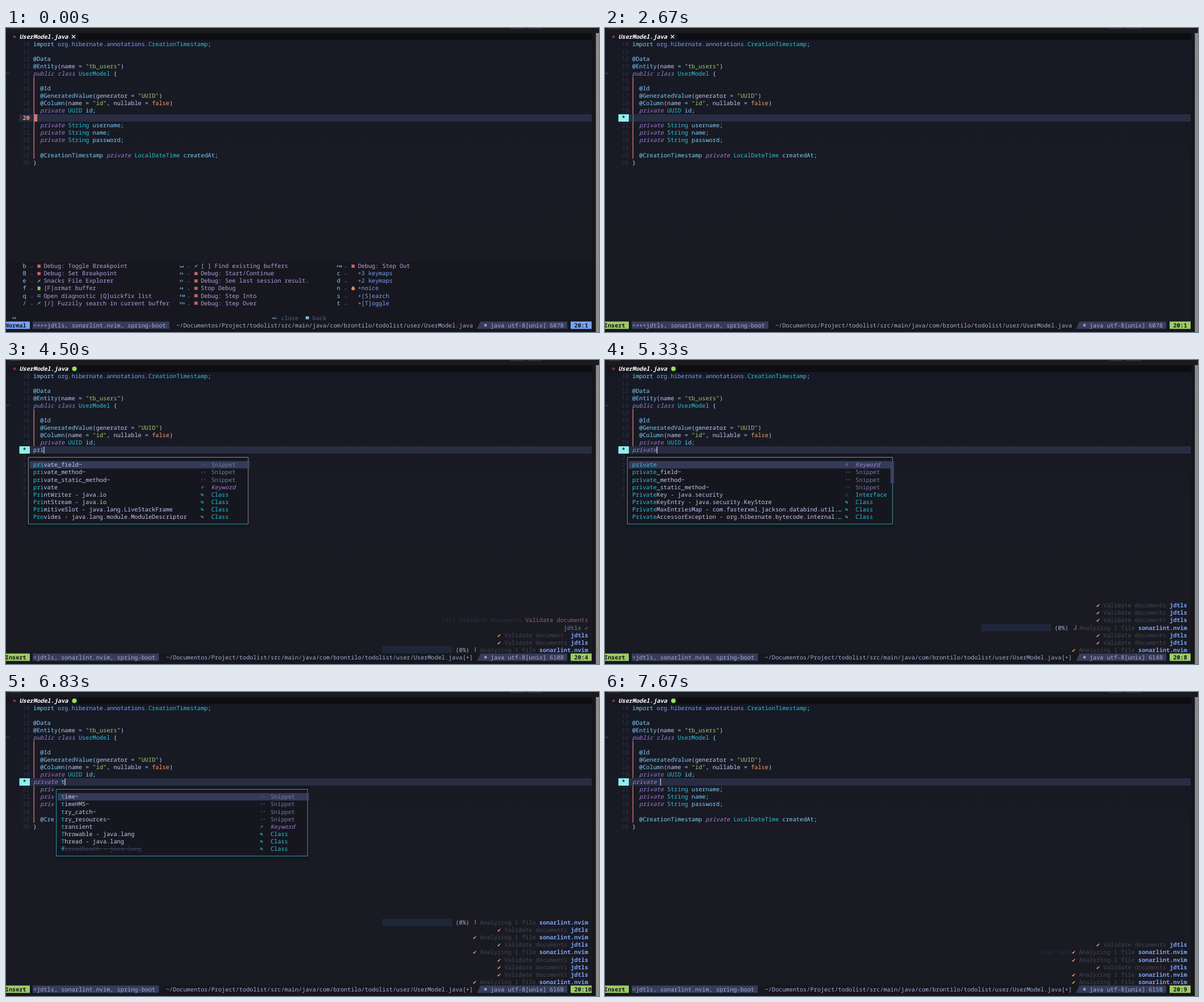
These frames come from a looping animation (1045x536 px, 8 s). An HTML page:

```html
<!DOCTYPE html>
<html lang="en">
<head>
<meta charset="utf-8">
<title>Editor completion</title>
<style>
  html, body { margin: 0; width: 100%; height: 100%; overflow: hidden; background: #191a23; }
  svg { display: block; width: 100%; height: 100%; }
  text {
    font: 10.25px "Noto Sans Mono", "DejaVu Sans Mono", "DejaVu Sans", monospace;
    white-space: pre; text-rendering: geometricPrecision; fill: #c0caf5;
  }
  .b { font-weight: 700; }
  .i { font-style: italic; }
  .k { fill: #9d7cd8; font-style: italic; }
  .t { fill: #2ac3de; }
  .a { fill: #7dcfff; }
  .p { fill: #7aa2f7; }
  .s { fill: #9ece6a; }
  .o { fill: #ff9e64; }
  .n { fill: #30354d; }
  .g { fill: #565f89; }
  .d { fill: #444654; }
  .l { fill: #b3a0e4; }
  .m { fill: #a4aed4; }
  .q { fill: #737aa2; }
  .f { fill: #2c3045; }
  .x { fill: #3b4261; text-decoration: line-through; }
  .u { fill: #8a6a60; }
  .w { fill: #ffffff; }
  .z { fill: #15161e; }
</style>
</head>
<body>
<svg viewBox="0 0 1045 536" preserveAspectRatio="none">
  <defs>
    <linearGradient id="bg" x2="0" y2="1">
      <stop offset="0" stop-color="#161924"/>
      <stop offset=".45" stop-color="#191a23"/>
      <stop offset="1" stop-color="#1a1a22"/>
    </linearGradient>
  </defs>
  <g id="view"></g>
</svg>
<script>
const LOOP = 8000, CELL = 6.15, ROW = 13.05;
const X = c => 48 + c * CELL;
const Y = r => 21.6 + r * ROW;
const view = document.getElementById('view');

const esc = s => s.replace(/&/g, '&amp;').replace(/</g, '&lt;');
const rect = (x, y, w, h, fill) => `<rect x="${x}" y="${y}" width="${w}" height="${h}" fill="${fill}"/>`;
const cells = (c, r, n, fill, rows = 1) => rect(X(c), Y(r), n * CELL, rows * ROW, fill);
const dot = (x, y, r, fill) => `<circle cx="${x}" cy="${y}" r="${r}" fill="${fill}"/>`;
const path = (d, stroke, w = 1) => `<path d="${d}" fill="none" stroke="${stroke}" stroke-width="${w}"/>`;
// «c text» colours a run with class c
const text = (c, r, s, cls = '', size = '') =>
  `<text x="${X(c)}" y="${Y(r) + 10.2}" class="${cls}"${size && ` style="font-size:${size}px"`}>` +
  esc(s).replace(/«(\w) (.*?)»/g, '<tspan class="$1">$2</tspan>') + '</text>';

const CODE = [
  '«a import» «p org.hibernate.annotations.»«t CreationTimestamp»«a ;»',
  '',
  '«a @Data»',
  '«a @Entity»(name «a =» «s "tb_users"»)',
  '«k public class» «t UserModel» {',
  '',
  '  «a @Id»',
  '  «a @GeneratedValue»(generator «a =» «s "UUID"»)',
  '  «a @Column»(name «a =» «s "id"», nullable «a =» «o false»)',
  '  «k private» «t UUID» «a id;»',
  '',
  '  «k private» «t String» «a username;»',
  '  «k private» «t String» «a name;»',
  '  «k private» «t String» «a password;»',
  '',
  '  «a @CreationTimestamp» «k private» «t LocalDateTime» «a createdAt;»',
  '}'
];

const KEYS = [
  [-3, ['b|bug|Debug: Toggle Breakpoint', 'B|bug|Debug: Set Breakpoint', 'e|pin|Snacks File Explorer',
    'f|file|[F]ormat buffer', 'q|list|Open diagnostic [Q]uickfix list', '/|pin|[/] Fuzzily search in current buffer']],
  [42, ['␣|pin|[ ] Find existing buffers', 'F5|bug|Debug: Start/Continue', 'F7|bug|Debug: See last session result.',
    'F9|bug|Stop Debug', 'F10|bug|Debug: Step Into', 'F11|bug|Debug: Step Over']],
  [87, ['F10|bug|Debug: Step Out', 'c||+3 keymaps', 'd||+2 keymaps', 'n|fire|+noice', 's||+[S]earch', 't||+[T]oggle']]
];

const KINDS = { s: ['Snippet', 'q', '‹›'], k: ['Keyword', 'k', '≡'], c: ['Class', 't', '↹'], i: ['Interface', 't', '⛬'] };
const SNIPPETS = ['s private_field~', 's private_method~', 's private_static_method~'];
const MENUS = {
  pri: { left: -2, right: 61, bar: 1, top: '#87929c', side: '#87929c', items: [...SNIPPETS, 'k private',
    'c PrintWriter - java.io', 'c PrintStream - java.io', 'c PrimitiveSlot - java.lang.LiveStackFrame',
    'c Provides - java.lang.module.ModuleDescriptor'] },
  private: { left: -2, right: 74, bar: 3, top: '#87929c', side: '#4f98a8', items: ['k private', ...SNIPPETS,
    'i PrivateKey - java.security', 'c PrivateKeyEntry - java.security.KeyStore',
    'c PrivateMaxEntriesMap - com.fasterxml.jackson.databind.util.…',
    'c PrivateAccessorException - org.hibernate.bytecode.internal.…'] },
  t: { left: 6, right: 78, bar: 1, top: '#27a1b9', side: '#27a1b9', items: ['s time~', 's timeHMS~', 's try_catch~',
    's try_resources~', 'k transient', 'c Throwable - java.lang', 'c Thread - java.lang', 'x ThreadDeath - java.lang'] }
};

// start, typed text, menu, notices from top to bottom (v validate, a analyzed, p in progress), spinner
const STEPS = [
  [0, '', '', ''],
  [4000, 'p', '', ''],
  [4170, 'p', '', 'p', '⠋'],
  [4330, 'pr', 'pri', 'vvp', '⠼'],
  [4500, 'pri', 'pri', 'mjwvp', '⠇'],
  [4670, 'priv', 'private', 'vvvp', '⠋'],
  [4830, 'priva', 'private', 'vvvp', '⠼'],
  [5000, 'privat', 'private', 'vpvva', '⠇'],
  [5170, 'private', 'private', 'vvpvva', '⠋'],
  [5330, 'private', 'private', 'vvvpvva', '⠼'],
  [5500, 'private', 'private', 'vvvpvva', '⠇'],
  [5670, 'private ', '', 'vvvavva', ''],
  [5830, 'private ', '', 'pvvvavvva', '⠋'],
  [6000, 'private t', '', 'pvvvavvva', '⠙'],
  [6170, 'private t', '', 'vpvvvavvva', '⠼'],
  [6330, 'private t', 't', 'vpvvvavvva', '⠇'],
  [6500, 'private t', 't', 'vvavavvva', ''],
  [6670, 'private t', 't', 'pvavavvva', '⠼'],
  [6830, 'private t', 't', 'pvavavvva', '⠇'],
  [7000, 'private t', 't', 'pvavavvva', '⠋'],
  [7170, 'private t', 't', 'pvavavvva', '⠼'],
  [7330, 'private t', 't', 'avavavvva', ''],
  [7500, 'private ', '', 'vavavaa', ''],
  [7670, 'private ', '', 'vaavaa', '']
];

function frame(dirty) {
  return rect(0, 0, 1045, 536, 'url(#bg)') + rect(0, 0, 1045, 9, '#1b1b1f') +
    rect(7, 0, 20, 1.5, '#34343a') + rect(888, 0, 24, 1.5, '#34343a') + rect(919, 0, 26, 1.5, '#34343a') +
    rect(0, 9, 1037, 12.5, '#0d0d12') + rect(0, 9, 128, 12.5, '#15161f') +
    dot(15, 15.5, 2.5, '#7d3238') + text(-4, -1, 'UserModel.java', 'b i w') +
    (dirty ? dot(120.5, 15.6, 4, '#9be05a') : path('M116 12.2l6 6m0-6l-6 6', '#e8e8ee', 1.4)) +
    rect(1033, 9, 6.5, 527, '#15161b') + rect(1039.5, 9, 5.5, 527, '#8f8d8b');
}

function code(typed, insert, mark, caret) {
  let out = cells(-4, 10, 0, 'none') + rect(23.4, Y(10), 1008.6, ROW, '#282d42');
  CODE.forEach((line, i) => {
    if (i !== 10) out += text(-3, i, String(i + 10), 'n');
    out += text(0, i, line);
  });
  out += path('M0.5 78.5l2.5 2.8l2.5-2.8', '#4a5a86');
  out += path(`M49.3 ${Y(5)}V${Y(10)}M49.3 ${Y(11)}V${Y(16)}`, '#c4686c', 1.6);
  if (!insert) {
    out += text(-3, 10, '20', 'b o') + rect(49, Y(10), 6.2, ROW, '#c9787a');
  } else {
    out += rect(23.6, Y(10), 18.4, ROW, '#8ff0ee') + text(-3, 10, mark, 'b z');
    const styled = typed.replace(/^private/, '«k private»').replace(/ t$/, ' «a t»');
    out += text(0, 10, styled, typed.startsWith('private') ? '' : 'a');
    if (caret) out += rect(X(typed.length) + (typed ? 0 : 1), Y(10) + 0.4, 1.2, 12.2, typed ? '#d5daf0' : '#7d8196');
  }
  return out;
}

function icon(kind, x, y) {
  if (kind === 'bug') return dot(x, y, 2.8, '#c9666b') + path(`M${x - 3.6} ${y - 2}h7.2m-7.2 4h7.2`, '#c9666b', 0.8);
  if (kind === 'pin') return path(`M${x - 2.5} ${y + 2.5}l5-5m-3.5 1l2.5 2.5`, '#7f8cb8', 1.1);
  if (kind === 'file') return rect(x - 2.5, y - 3.2, 5, 6.4, '#7fc27a');
  if (kind === 'list') return path(`M${x - 3} ${y - 1.5}h6m-6 3h6`, '#8a90ab', 1.1);
  if (kind === 'fire') return `<path d="M${x} ${y - 4}q5 4 2.6 6.4q-2.6 2-5.2 0q-1.6-2.6 2.6-6.4" fill="#e58a5c"/>`;
  return '';
}

function keyHelp() {
  let out = rect(0, 413, 1033, 104.5, '#17171f');
  for (const [col, list] of KEYS) {
    list.forEach((entry, i) => {
      const [key, pic, label] = entry.split('|'), r = 30 + i;
      out += key === '␣' ? path(`M${X(col) + 1} ${Y(r) + 6}v2.5h5v-2.5`, '#7dcfff')
        : text(col, key.length > 1 ? r - 0.13 : r, key, key.length > 1 ? 'a b' : 'a', key.length > 1 ? 5 : '');
      out += text(col + 2, r, '→', 'g') + icon(pic, X(col + 4) + 4, Y(r) + 6.8) +
        text(col + 6, r, label, label[0] === '+' ? 'p' : 'l');
    });
  }
  return out + path('M12 509.5v2.5h5v-2.5', '#7dcfff') + text(68.5, 36.87, 'esc', 'a b', 4.5) +
    text(71, 37, 'close', 'g') + rect(528, 508.5, 6, 5, '#86b4d8') + text(80, 37, 'back', 'g');
}

function popup({ left, right, bar, top, side, items }, typed) {
  const x1 = X(left + 0.5) + 0.6, x2 = X(right + 0.5) + 0.6, y1 = Y(11) + 6.4, y2 = Y(20) + 6.6;
  const hit = typed.split(' ').pop().length;
  let out = cells(left, 11, right - left + 1, '#16161e', 10) +
    path(`M${x1} ${y1}H${x2}`, top) + path(`M${x1} ${y1}V${y2}M${x2} ${y1}V${y2}`, side) +
    path(`M${x1} ${y2}H${x2}`, '#27a1b9') + cells(left + 1, 12, right - left - 1, '#343a58') +
    cells(right, 12, 1, '#3b4261', bar);
  items.forEach((item, i) => {
    const r = 12 + i, old = item[0] === 'x', name = item.slice(2);
    const [label, cls, pic] = KINDS[old ? 'c' : item[0]];
    out += text(left + 2, r, `«t ${name.slice(0, hit)}»` +
      (hit < name.length ? `«${old ? 'x' : 'e'} ${name.slice(hit)}»` : ''));
    if (old) out += path(`M${X(left + 2)} ${Y(r) + 6.6}h6`, '#2ac3de');
    out += text(right - 13, r - 0.08, pic, cls, 8) + text(right - 10, r, label, cls);
  });
  return out;
}

function notice(kind, r, spin) {
  const check = c => text(c, r, '✔', 'o');
  const valid = s => check(133) + text(135, r, s, 'd') + text(154, r, 'jdtls', 'b p');
  const analyze = text(128, r, 'Analyzing 1 file', 'd') + text(145, r, 'sonarlint.nvim', 'b p');
  switch (kind) {
    case 'v': return valid('Validate documents');
    case 'w': return valid('Validate document');
    case 'a': return check(126) + analyze;
    case 'p': return cells(100, r, 20, '#20263a') + text(121, r, '(0%)', 'm') + text(126.3, r, spin, 'o') + analyze;
    case 'm': return text(117, r, '(2x) Validate documents', 'f') + text(141, r, 'Validate documents', 'u');
    case 'j': return text(152, r, 'jdtls', 'g b') + text(158, r, '✔', 'g');
  }
}

function status(typed, insert) {
  const accent = insert ? '#9ccc65' : '#7aa2f7', fill = '#363c59';
  const servers = (typed ? '<' : '<+++') + 'jdtls, sonarlint.nvim, spring-boot';
  const file = '~/Documentos/Project/todolist/src/main/java/com/brontilo/todolist/user/UserModel.java';
  const y = Y(38), size = 607 + typed.length;
  return rect(0, y, 1033, 18.5, '#16171f') + rect(0, y, 42, ROW, accent) +
    text(-8, 38, insert ? ' Insert' : ' Normal', 'b z').replace(/x="[^"]+"/, `x="${X(-9)}"`) +
    rect(47, y, (servers.length + 1) * CELL + 1, ROW, fill) + text(0, 38, servers, 'm') +
    text(typed ? 38 : 41, 38, file + (typed ? '[+]' : ''), 'm') +
    `<path d="M836 ${y}H989V${y + ROW}H830Z" fill="${fill}"/>` + dot(845, y + 6.6, 2.5, '#8d95b5') +
    text(131, 38, `java utf-8[unix] ${size}B`, 'm') +
    rect(995, y, 37, ROW, accent) + text(155, 38, '20:' + (typed.length + 1), 'b z');
}

function draw(t) {
  const [start, typed, menu, notes, spin] = STEPS.findLast(s => s[0] <= t);
  const insert = t >= 2000;
  const mark = (t < 2170 || (t >= 6000 && t < 6330)) ? '0' : '*';
  let out = frame(typed) + code(typed, insert, mark, t < 2000 || t >= 2670);
  if (t < 1000) out += keyHelp();
  if (start === 7670) out += text(117, 33, '(6x) Vali', 'f');
  [...notes].forEach((n, i) => out += notice(n, 38 - notes.length + i, spin));
  if (menu) out += popup(MENUS[menu], typed);
  return out + status(typed, insert);
}

let shown = '';
function tick(now) {
  const next = draw(now % LOOP);
  if (next !== shown) view.innerHTML = shown = next;
  requestAnimationFrame(tick);
}
tick(0);
</script>
</body>
</html>
```
